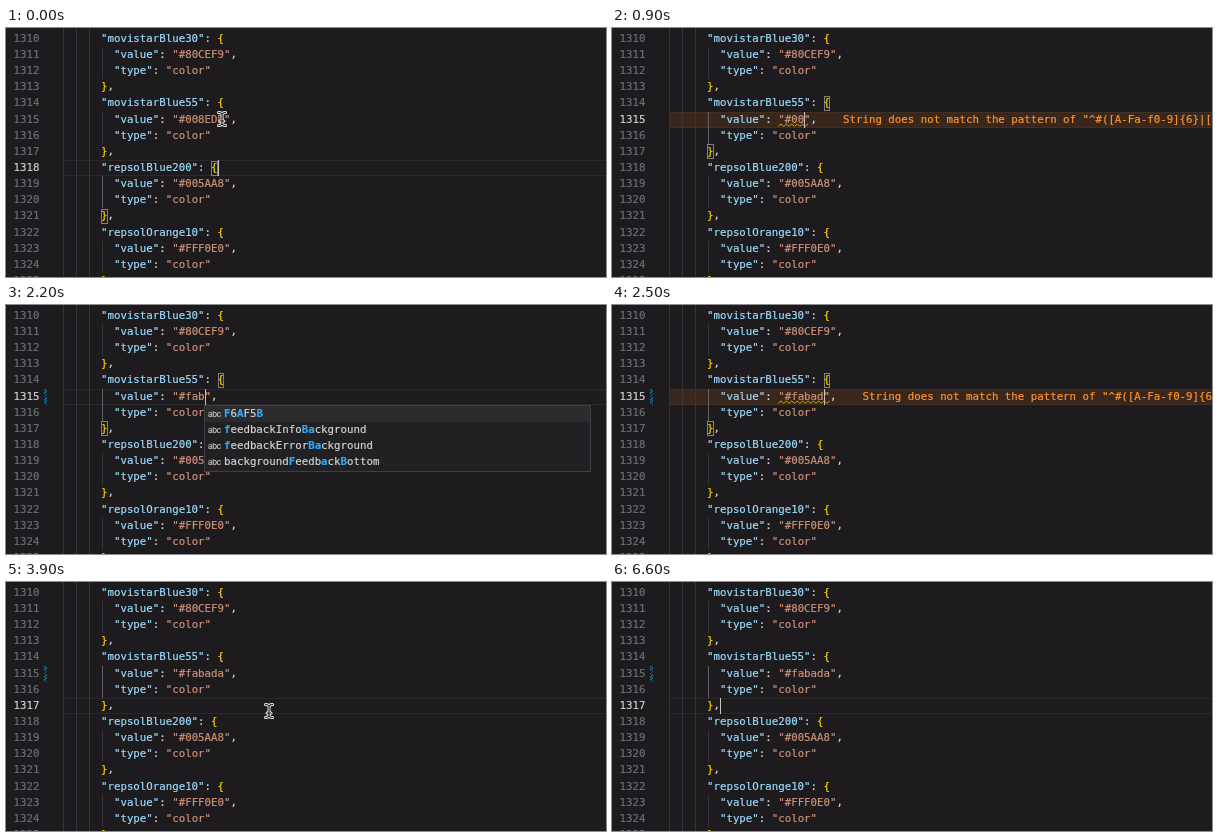
Animation of 600 by 249 pixels, one loop 6.7 s. Source, as an HTML page:

```html
<!DOCTYPE html>
<html lang="en">
<head>
<meta charset="utf-8">
<title>Editing a colour token</title>
<style>
  html, body { margin: 0; width: 100%; height: 100%; overflow: hidden; background: #1d1b1e; }
  #stage {
    position: relative; width: 600px; height: 249px; overflow: hidden; background: #1d1b1e;
    color: #d4d4d4; font: 10.76px/16.14px "DejaVu Sans Mono", monospace; white-space: pre;
    -webkit-text-stroke: .2px;
  }
  #stage > * { position: absolute; }
  .key { color: #9cdcfe; }
  .str { color: #ce9178; }
  .brace { color: #ffd700; }
  .num { left: 7.5px; color: #6a6f75; }
  .num.on { color: #cfcfcf; }
  .guide { width: 1px; background: #363438; }
  #active { width: 1px; height: 32.28px; background: #626064; }
  #line { left: 56.5px; width: 546px; height: 16.14px; box-sizing: border-box; border: 1.5px solid #2a282b; }
  #line.bad { background: #39271d; border-color: #432f22; }
  .match { width: 6.5px; height: 15px; box-sizing: border-box; border: 1px solid #808080; }
  #mark {
    left: 38px; width: 3px; height: 16.14px;
    background: repeating-linear-gradient(-45deg, #19698a 0 1.2px, #1d1b1e 1.2px 2.4px);
  }
  #message { color: #ff942f; }
  #wave { left: 0; top: 0; fill: none; stroke: #cca700; stroke-width: 1; }
  #caret { width: 1px; height: 16.14px; background: #c4c4c4; }
  #popup {
    left: 198px; top: 100px; width: 387px; height: 67px; box-sizing: border-box;
    border: 1px solid #403e42; background: #212022;
  }
  #popup div { height: 16.14px; padding-left: 3px; }
  #popup div:first-child { background: #2c2b2e; }
  #popup i { display: inline-block; width: 16px; font: 8px/16px Inter, sans-serif; color: #c5c5c5; letter-spacing: -.3px; }
  #popup b { color: #2aaaff; }
  #pointer { left: 0; top: 0; overflow: visible; fill: none; stroke-linecap: round; }
</style>
</head>
<body>
<div id="stage"></div>
<script>
const LOOP = 6700, CH = 6.478, ROW = 16.14, TOP = 2.9, LEFT = 95, FIRST = 1310;
const stage = document.getElementById('stage');
const rowY = n => TOP + (n - FIRST) * ROW;
const colX = c => LEFT + c * CH;
const guideX = level => 56.7 + level * 2 * CH;

function add(html, style = {}) {
  stage.insertAdjacentHTML('beforeend', html);
  const el = stage.lastElementChild;
  for (const k in style) el.style[k] = style[k] + 'px';
  return el;
}
const span = (cls, text) => `<span class="${cls}">${text}</span>`;
const show = (el, on) => { el.style.visibility = on ? 'visible' : 'hidden'; };
const valueLine = hex => span('key', '"value"') + ': ' + span('str', `"#${hex}"`) + ',';

const line = add('<div id="line"></div>');
for (let i = 0; i < 3; i++) add('<div class="guide"></div>', { left: guideX(i), top: 0, height: 249 });

// Code rows: four per token
const tokens = [['movistarBlue30', '80CEF9'], ['movistarBlue55', '008EDD'],
  ['repsolBlue200', '005AA8'], ['repsolOrange10', 'FFF0E0']];
const numbers = {};
let edited;
tokens.forEach(([name, hex], i) => {
  const start = FIRST + i * 4;
  const rows = [
    [0, span('key', `"${name}"`) + ': ' + span('brace', '{')],
    [2, valueLine(hex)],
    [2, span('key', '"type"') + ': ' + span('str', '"color"')],
    [0, span('brace', '}') + ',']
  ];
  add('<div class="guide"></div>', { left: guideX(3), top: rowY(start + 1), height: ROW * 2 });
  rows.forEach(([indent, html], j) => {
    const n = start + j, top = rowY(n);
    numbers[n] = add(`<div class="num">${n}</div>`, { top });
    const code = add(`<div>${html}</div>`, { left: colX(indent), top });
    if (n === 1315) edited = code;
  });
});

const active = add('<div id="active"></div>', { left: guideX(3) });
const matches = [0, 1].map(() => add('<div class="match"></div>'));
const mark = add('<div id="mark"></div>', { top: rowY(1315) });
const message = add('<div id="message">String does not match the pattern of "^#([A-Fa-f0-9]{6}|[A-Fa-f0-9]{3})$".</div>',
  { top: rowY(1315) });
const wave = add('<svg id="wave" width="600" height="249"><path/></svg>');
const caret = add('<div id="caret"></div>');
const popup = add('<div id="popup">' +
  ['*F*6*A*F5*B*', '*f*eedbackInfo*Ba*ckground', '*f*eedbackError*Ba*ckground', 'background*F*eedb*a*ck*B*ottom']
    .map(s => `<div><i>abc</i>${s.replace(/\*(.+?)\*/g, '<b>$1</b>')}</div>`).join('') + '</div>');
const beam = 'M-3.5-6.5Q0-6.5 0-4Q0-6.5 3.5-6.5M0-4V4M-2 2H2M-3.5 6.5Q0 6.5 0 4Q0 6.5 3.5 6.5';
const pointer = add(`<svg id="pointer" width="1" height="1"><path d="${beam}" stroke="#eee" stroke-width="3"/>` +
  `<path d="${beam}" stroke="#151515" stroke-width="1.1"/></svg>`);

const typing = [[0, '008EDD'], [500, '008ED'], [600, '008E'], [700, '008'], [800, '00'], [1000, '0'], [1100, ''],
  [1700, 'f'], [1900, 'fa'], [2100, 'fab'], [2400, 'faba'], [2500, 'fabad'], [2600, 'fabada']];
const clicks = [[0, 1318], [300, 1315], [3400, 1317]];
const path = [[2900, 232, 96], [3000, 248, 109], [3100, 261, 118], [3250, 271, 126], [3400, 263, 129]];
const latest = (list, t) => list.filter(step => step[0] <= t).pop() || list[0];

function pointerAt(t) {
  if (t < 500) return [216, 91];
  if (t < 2900 || t >= 5400) return null;
  const i = path.findIndex(p => p[0] > t);
  if (i < 0) return path[path.length - 1].slice(1);
  const [a, b] = [path[i - 1], path[i]], k = (t - a[0]) / (b[0] - a[0]);
  return [a[1] + (b[1] - a[1]) * k, a[2] + (b[2] - a[2]) * k];
}

function wavePath(from, to) {
  let d = '';
  for (let x = from, i = 0; x <= to; x += 2.7, i++) d += `${i ? 'L' : 'M'}${x} ${i % 2 ? 96 : 98.3}`;
  return d;
}

function draw(t) {
  const [typedAt, hex] = latest(typing, t);
  const [clickedAt, row] = latest(clicks, t);
  // Validation lags one step behind typing
  const checked = latest(typing, t - 100)[1].length;
  const bad = checked !== 3 && checked !== 6;

  edited.innerHTML = valueLine(hex);
  for (const n in numbers) numbers[n].classList.toggle('on', +n === row);
  line.style.top = rowY(row) + 'px';
  line.classList.toggle('bad', bad);

  const block = row === 1318 ? 1318 : 1314;
  active.style.top = rowY(block + 1) + 'px';
  [[block, row === 1318 ? 16 : 17], [block + 3, 0]].forEach(([n, col], i) => {
    matches[i].style.left = colX(col + (i ? 0 : 1)) + 'px';
    matches[i].style.top = rowY(n) + .5 + 'px';
    show(matches[i], row !== 1317);
  });

  show(mark, t >= 1300);
  show(message, bad);
  show(wave, bad);
  message.style.left = colX(19 + hex.length) + 'px';
  wave.firstChild.setAttribute('d', wavePath(colX(11), colX(14 + hex.length)));
  show(popup, t >= 2200 && t < 2400);

  const col = row === 1315 ? 13 + hex.length : row === 1318 ? 18 : 2;
  caret.style.left = colX(col) + 'px';
  caret.style.top = rowY(row) + 'px';
  show(caret, (t - Math.max(typedAt, clickedAt)) % 1000 < 500);

  const spot = pointerAt(t);
  show(pointer, spot);
  if (spot) pointer.style.transform = `translate(${spot[0]}px, ${spot[1]}px)`;
}

const began = performance.now();
function tick() {
  draw((performance.now() - began) % LOOP);
  requestAnimationFrame(tick);
}
tick();
</script>
</body>
</html>
```
